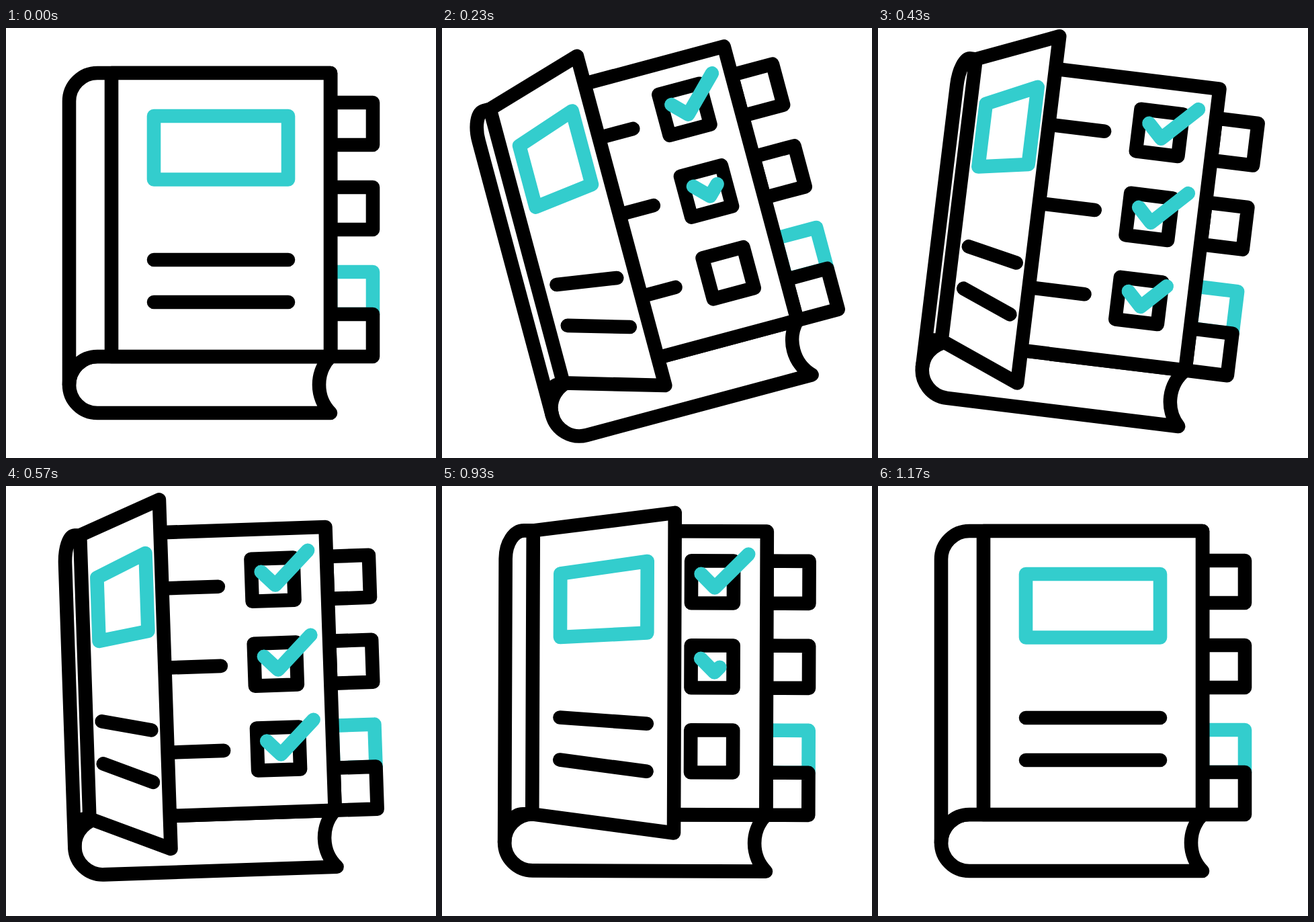
These frames come from a looping animation (640 by 640 pixels, 1.67 s). An HTML page:

```html
<!DOCTYPE html>
<html lang="en">
<head>
<meta charset="utf-8">
<title>Checklist book</title>
<style>
  html, body { margin: 0; width: 100%; height: 100%; overflow: hidden; background: #fff; }
  svg { display: block; width: 100vw; height: 100vh; }
  path { fill: #fff; stroke: #000; stroke-width: 20.6; stroke-linecap: round; stroke-linejoin: round; }
  .line { fill: none; }
  .teal { stroke: #33cdcd; }
</style>
</head>
<body>
<svg viewBox="0 0 640 640">
  <g id="book">
    <path d="M483 489H136A42 42 0 0 0 136 573H483C472.5 562.5 466 547 466 531S472.5 499.5 483 489"/>
    <path class="teal" d="M483 363H546V426H483Z"/>
    <path d="M483 111H546V174H483ZM483 237H546V300H483ZM483 426H546V489H483Z"/>
    <path d="M157 67H483V489H157Z"/>
    <path class="line" d="M200 150.3H320.5M200 268.5H320.5M200 394.6H320.5"/>
    <path d="M370.5 111h63v63h-63ZM370.5 237h63v63h-63ZM370.5 363h63v63h-63Z"/>
    <path class="line teal check" pathLength="1" d="M385 130.5l20.5 20.5l50 -50"/>
    <path class="line teal check" pathLength="1" d="M385 256.5l20.5 20.5l50 -50"/>
    <path class="line teal check" pathLength="1" d="M385 382.5l20.5 20.5l50 -50"/>
    <path id="cover"/>
    <path id="label" class="teal"/>
    <path id="lines" class="line"/>
  </g>
</svg>
<script>
const LOOP = 1670;
const $ = id => document.getElementById(id);
const checks = document.querySelectorAll('.check');

// Swing keys: [frame, degrees], at 30 frames per second
const swing = [[0, 0], [7, -15], [12.8, 7], [18.8, -4.4], [24.3, 1.8], [29, 0]];

const ramp = (f, from, to) => Math.min(1, Math.max(0, (f - from) / (to - from)));
const ease = (f, from, to) => {
  const u = ramp(f, from, to);
  return u * u * (3 - 2 * u);
};

function swingAngle(f) {
  let angle = 0;
  for (let i = 1; i < swing.length; i++) {
    const [start, a] = swing[i - 1], [end, b] = swing[i];
    angle += (b - a) * ease(f, start, end);
  }
  return angle;
}

function drawCover(open) {
  const hinge = 157 - 39.5 * open;
  const edge = 483 - 246 * open;
  const lift = 49 * open;
  const radius = 42 * (hinge - 94) / 63;
  const px = x => hinge + (x - 157) * (edge - hinge) / 326;
  const left = px(220), right = px(420);

  $('cover').setAttribute('d',
    `M94 531V109A${radius} 42 0 0 1 ${94 + radius} 67H${hinge}L${edge} ${67 - lift}V${489 + lift}` +
    `L${hinge} 489H${94 + radius}A${radius} 42 0 0 0 94 531M${hinge} 67V489`);
  $('label').setAttribute('d',
    `M${left} 131L${right} ${131 - 34 * open}V${225.5 - 12.5 * open}L${left} 225.5Z`);
  $('lines').setAttribute('d',
    `M${left} 345L${right} ${345 + 15.5 * open}M${left} 408L${right} ${408 + 30 * open}`);
}

function render(ms) {
  const f = Math.floor((Math.floor(ms / 10) + 0.5) * 0.3);
  $('book').setAttribute('transform', `rotate(${swingAngle(f)} 301 288)`);
  drawCover(ease(f, 0, 9) - ease(f, 22, 35));
  checks.forEach((check, i) => {
    const drawn = ramp(f, i * 14 / 3, (i + 1) * 14 / 3) - ramp(f, 30 - 5 * i, 35 - 5 * i);
    check.style.visibility = drawn > 0.001 ? 'visible' : 'hidden';
    check.style.strokeDasharray = `${drawn} 2`;
  });
}

const begin = performance.now();
function tick() {
  render((performance.now() - begin) % LOOP);
  requestAnimationFrame(tick);
}
tick();
</script>
</body>
</html>
```
